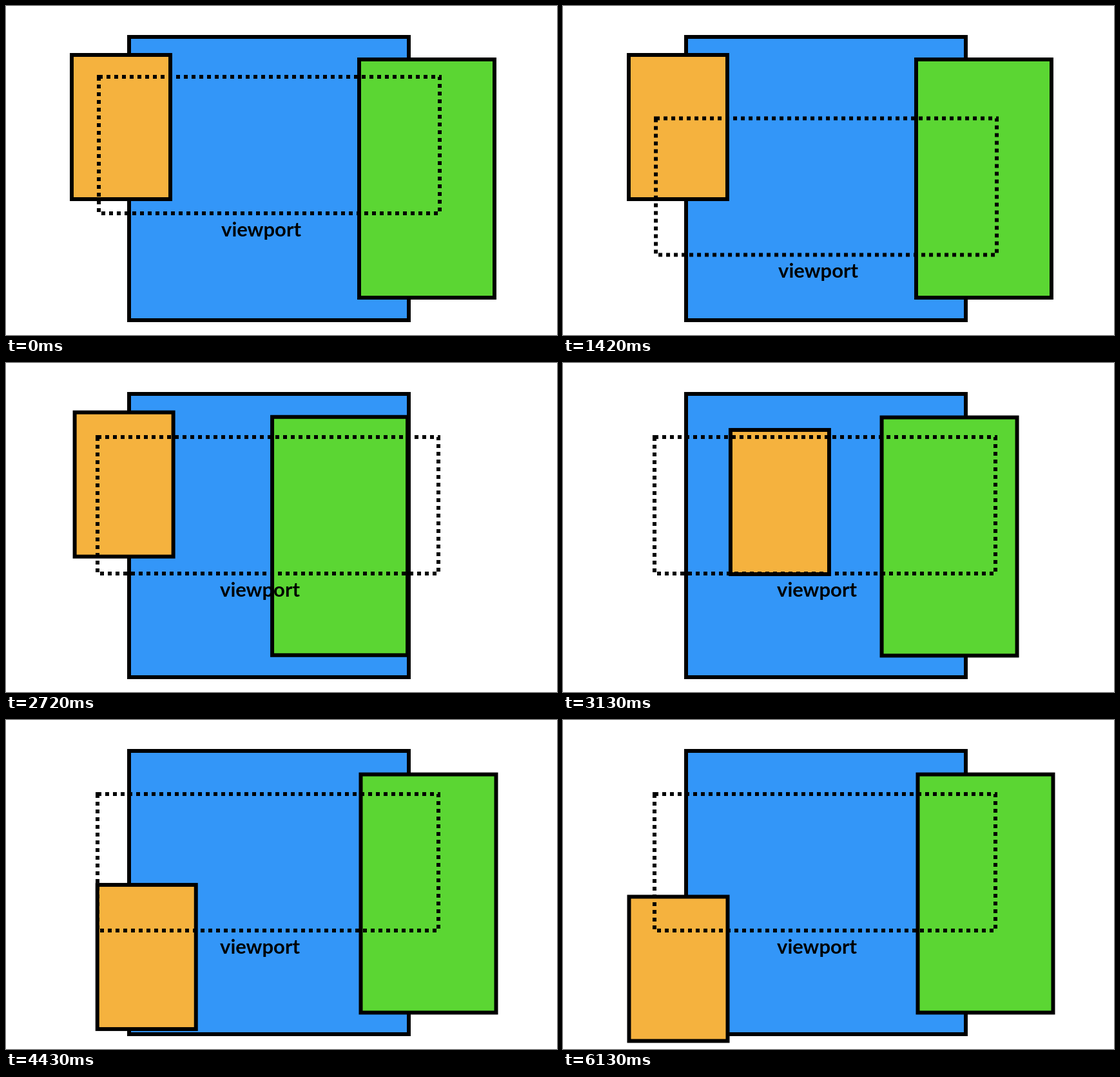
Animation of 855x511 px, one loop 6190 ms. Source, as an HTML page with a canvas:

```html
<!DOCTYPE html>
<html lang="en">
<head>
<meta charset="utf-8">
<title>Viewport</title>
<style>
html, body { margin: 0; width: 100%; height: 100%; overflow: hidden; background: #fff; }
canvas { display: block; }
</style>
</head>
<body>
<canvas id="stage" width="855" height="511"></canvas>
<script>
const ctx = document.getElementById('stage').getContext('2d');
const LOOP = 6190;
const STEPS = 91;
const LEAD = 20; // ms by which each step is shown early

// Each drag is one eased Bezier curve of offsets between two steps
const drags = {
  viewport: { from: 0, to: 29, curve: [[0, 0], [84, -205], [474.5, 138], [-165, 118.5], [-2, 5]] },
  green: { from: 29, to: 52, curve: [[0, 0], [-246, 0], [-107, 1.8], [2.5, 1.5]] },
  orange: { from: 39, to: 72, curve: [[0, 0], [572, 82.5], [70, 147], [0.5, 198.5]] }
};

// De Casteljau: blend neighbours until one point is left
function bezier(points, p) {
  if (points.length === 1) return points[0];
  const blended = points.slice(1).map(([x, y], i) => {
    const [px, py] = points[i];
    return [px + (x - px) * p, py + (y - py) * p];
  });
  return bezier(blended, p);
}

function offsetOf(name, step) {
  const { from, to, curve } = drags[name];
  const u = Math.min(1, Math.max(0, (step - from) / (to - from)));
  return bezier(curve, u * u * (3 - 2 * u));
}

function box(color, x, y, w, h, [dx, dy] = [0, 0]) {
  ctx.fillStyle = color;
  ctx.fillRect(x + dx, y + dy, w, h);
  ctx.strokeRect(x + dx, y + dy, w, h);
}

function viewport([dx, dy]) {
  ctx.save();
  ctx.translate(dx, dy);
  ctx.setLineDash([6, 6]);
  ctx.strokeRect(144, 110, 529, 212);
  ctx.fillStyle = '#000';
  ctx.font = '700 31px Lato, sans-serif';
  ctx.textAlign = 'center';
  ctx.fillText('viewport', 396, 358);
  ctx.restore();
}

function draw(time) {
  const step = Math.floor((time % LOOP + LEAD) / LOOP * STEPS) % STEPS;
  ctx.fillStyle = '#fff';
  ctx.fillRect(0, 0, 855, 511);
  ctx.strokeStyle = '#000';
  ctx.lineWidth = 6;
  box('#3396f8', 191, 48, 434, 440);
  box('#5bd633', 548, 83, 210, 370, offsetOf('green', step));
  box('#f5b23e', 102, 76, 153, 224, offsetOf('orange', step));
  viewport(offsetOf('viewport', step));
}

const start = performance.now();
function tick() {
  draw(performance.now() - start);
  requestAnimationFrame(tick);
}
tick();
</script>
</body>
</html>
```
